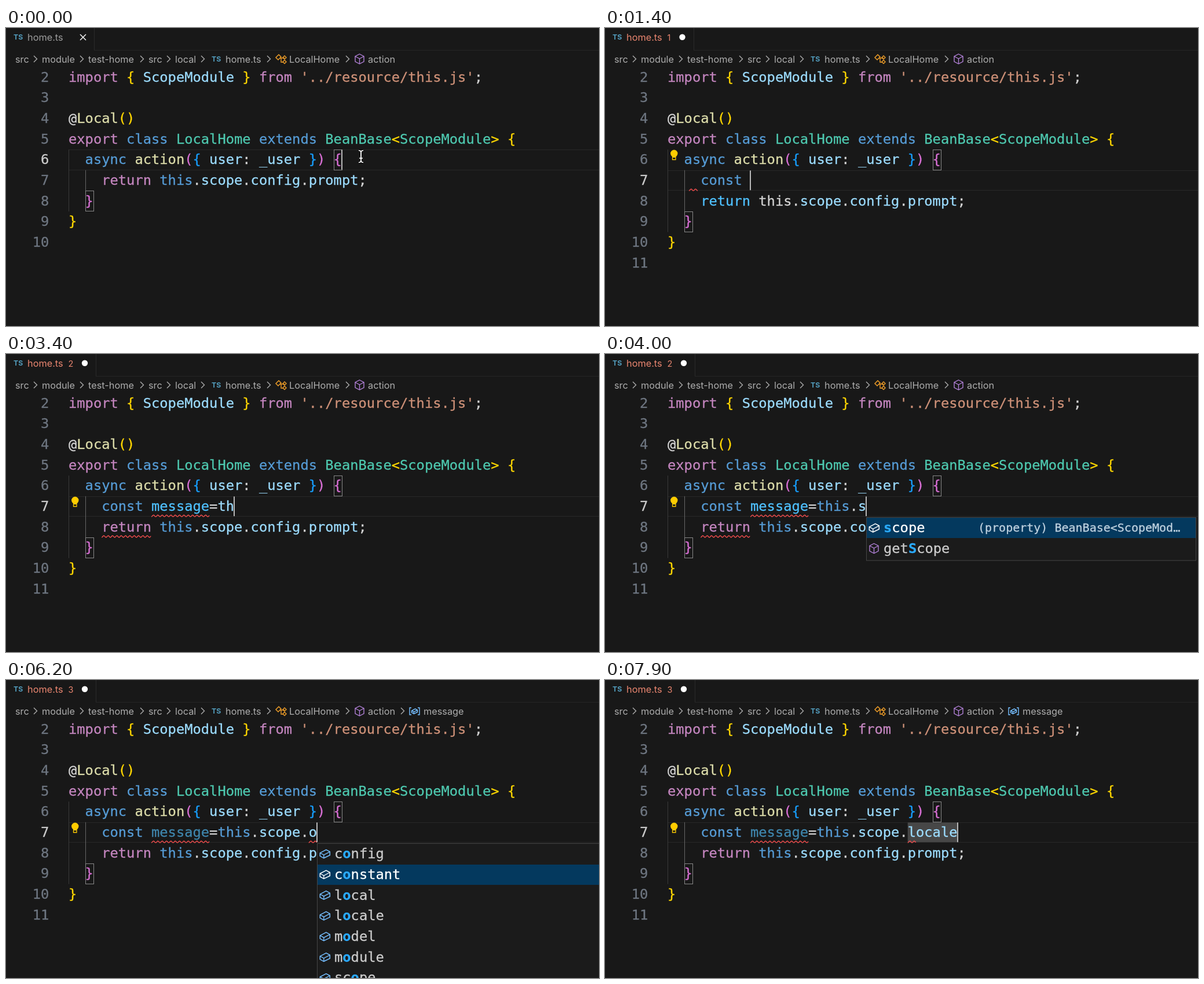
An HTML page with a canvas for the animation above (8 s loop, 1024 px wide and 515 px high).

```html
<!DOCTYPE html>
<html lang="en">
<head>
<meta charset="utf-8">
<title>Editor typing</title>
<style>
  html, body { margin: 0; width: 100%; height: 100%; overflow: hidden; background: #181818; }
  canvas { display: block; }
</style>
</head>
<body>
<canvas id="stage" width="1024" height="515"></canvas>
<script>
const ctx = document.getElementById('stage').getContext('2d');
const LOOP = 8000, LEFT = 108, CHAR = 14.3, LINE = 35.65, BASE = 7.8;
const MONO = '"DejaVu Sans Mono", monospace', SANS = 'Inter, sans-serif';
const C = {
  text: '#d4d4d4', flow: '#c586c0', key: '#569cd6', type: '#4ec9b0', name: '#9cdcfe', fn: '#dcdcaa',
  str: '#ce9178', gold: '#ffd700', pink: '#da70d6', blue: '#179fff', bind: '#4fc1ff', faded: '#3f86ad',
  dim: '#6e7681', crumb: '#adadad', error: '#f14c4c', tabError: '#ea8670', field: '#75beff', method: '#b180d7'
};

// Contents of line 7 after the indent, by time
const edits = [[500, '']];
const type = (start, step, before, added) => [...added].forEach((_, i) =>
  edits.push([start + i * step, before + added.slice(0, i + 1)]));
type(700, 100, '', 'const ');
type(1600, 100, 'const ', 'mess');
type(2400, 150, 'const mess', 'age');
type(2900, 100, 'const message', '=');
type(3300, 100, 'const message=', 'this.');
edits.push([3900, 'const message=this.s'], [4300, 'const message=this.scope'],
  [4600, 'const message=this.scope.'], [4900, 'const message=this.scope.o'],
  [7600, 'const message=this.scope.locale']);

const colX = col => LEFT + col * CHAR;
const mid = line => 85 + (line - 2) * LINE;
const between = (t, a, b) => t >= a && t < b;

function text(str, x, y, color, font) {
  ctx.font = font;
  ctx.fillStyle = color;
  ctx.fillText(str, x, y);
}
// A hairline outline gives the slightly heavier editor weight
function mono(str, x, y, color, weight = '', size = 23.75) {
  text(str, x, y, color, `${weight} ${size}px ${MONO}`);
  ctx.strokeStyle = color;
  ctx.lineWidth = .3;
  ctx.strokeText(str, x, y);
}
const sans = (str, x, y, color = C.crumb) => text(str, x, y, color, `16.3px ${SANS}`);
const badge = (x, y) => text('TS', x, y, '#519aba', `bold 12.3px ${SANS}`);

function rect(x, y, w, h, color) {
  ctx.fillStyle = color;
  ctx.fillRect(x, y, w, h);
}
function path(points, color, width = 1.4, close = false) {
  ctx.beginPath();
  points.forEach(([x, y]) => ctx.lineTo(x, y));
  if (close) ctx.closePath();
  ctx.strokeStyle = color;
  ctx.lineWidth = width;
  ctx.stroke();
}
function dot(x, y, r, color) {
  ctx.beginPath();
  ctx.arc(x, y, r, 0, 7);
  ctx.fillStyle = color;
  ctx.fill();
}

// Spans alternate colour name and text
function code(line, col, ...spans) {
  for (let i = 0; i < spans.length; i += 2) {
    mono(spans[i + 1], colX(col), mid(line) + BASE, C[spans[i]]);
    col += spans[i + 1].length;
  }
}
function squiggle(line, from, to) {
  const points = [], y = mid(line) + 16.5;
  for (let x = from; x <= to; x++) points.push([x, y + 1.5 * Math.cos((x - from) * Math.PI / 3.75)]);
  path(points, C.error, 1.4);
}
function bracketBox(line, col) {
  ctx.strokeStyle = '#888';
  ctx.lineWidth = 1;
  ctx.strokeRect(Math.round(colX(col)) + .5, Math.round(mid(line) - 18) + .5, 14, 35);
}
function cube(x, y, color) {
  const p = (dx, dy) => [x + dx, y + dy];
  path([p(0, -8.5), p(7.5, -4.5), p(7.5, 4.5), p(0, 8.5), p(-7.5, 4.5), p(-7.5, -4.5)], color, 1.4, true);
  path([p(-7.5, -4.5), p(0, -.5), p(7.5, -4.5)], color);
  path([p(0, -.5), p(0, 8.5)], color);
}
function brick(x, y, color, s = 1) {
  const p = (dx, dy) => [x + dx * s, y + dy * s];
  path([p(-8.5, -1.5), p(2, -7), p(8.5, -3.5), p(8.5, 2.5), p(-2, 7.5), p(-8.5, 4)], color, 1.5, true);
  path([p(-8.5, -1.5), p(-2, 2), p(8.5, -3.5)], color);
  path([p(-2, 2), p(-2, 7.5)], color);
}

function drawHeader(t) {
  const errors = t < 1000 ? 0 : t < 3000 ? 1 : t < 4500 ? 2 : 3;
  const edge = [152, 153, 155, 155][errors];
  rect(edge, 0, 1, 38, '#2b2b2b');
  rect(edge, 38, 1024, 1, '#252525');
  badge(13, 20);
  sans('home.ts', 37, 22, errors ? C.tabError : '#9d9d9d');
  if (errors) text(errors, 107.5, 21.5, C.tabError, `14.5px ${SANS}`);
  if (t < 500) {
    path([[128, 11], [138, 21]], '#eee', 1.6);
    path([[138, 11], [128, 21]], '#eee', 1.6);
  } else dot(errors > 1 ? 136 : 133.5, 15.7, 5.2, '#fff');

  const crumbs = [['src', 16, 51], ['module', 62, 131], ['test-home', 142, 235], ['src', 246, 281],
    ['local', 292, 340], ['home.ts', 379, 454], ['LocalHome', 489, 590], ['action', 625, 685], ['message', 721]];
  const shown = t >= 5300 ? 9 : 8;
  crumbs.slice(0, shown).forEach(([label, x, next], i) => {
    sans(label, x, 59.7);
    if (i < shown - 1) path([[next - 3, 48], [next + 2.5, 53.5], [next - 3, 59]], C.crumb);
  });
  badge(355, 58);
  const orange = '#ee9d28';
  path([[466, 51], [471, 46], [475, 50], [470, 55]], orange, 1.5, true);
  path([[473, 52], [481, 52]], orange);
  path([[475, 52], [475, 59], [479, 59]], orange);
  for (const y of [51, 58.5]) path([[478, y], [481, y - 3], [484, y], [481, y + 3]], orange, 1.4, true);
  cube(610.5, 53.5, C.method);
  if (shown > 8) {
    path([[700, 48], [697, 48], [697, 60], [700, 60]], C.field);
    path([[711, 48], [714, 48], [714, 60], [711, 60]], C.field);
    brick(705.5, 54, C.field, .58);
  }
}

function drawLineSeven(t, str) {
  if (between(t, 2200, 2400)) rect(colX(10), mid(7) - 17, 4 * CHAR, 34, '#474747');
  if (t >= 7800) rect(colX(29), mid(7) - 17, 6 * CHAR, 34, '#474747');
  const [, key, name, rest] = str.match(/^(\w* ?)(\w*)(.*)$/);
  const faded = between(t, 2200, 2400) || t >= 5900;
  code(7, 4, key.startsWith('const') ? 'key' : 'name', key, faded ? 'faded' : 'bind', name);
  let col = 4 + key.length + name.length;
  for (const part of rest.match(/\w+|\W/g) || []) {
    code(7, col, part === 'this' ? 'key' : /\w/.test(part) ? 'name' : 'text', part);
    col += part.length;
  }
  if (between(t, 1300, 1600)) squiggle(7, 145, 160);
  if (t >= 2000) squiggle(7, colX(10), colX(10 + name.length));
  if (between(t, 4900, 5300)) squiggle(7, colX(30), 545);
  if (t >= 5300) squiggle(7, colX(29), colX(30));
}

function drawBulb(y) {
  dot(119.3, y - 3.2, 6.2, '#ffcc00');
  rect(116, y, 6.6, 4, '#ffcc00');
  path([[116.5, y + 4], [116.5, y + 7.5], [122, y + 7.5], [122, y + 4]], '#ffcc00', 1.3);
}

function drawPopup(x, width, items, match, selected, detail, detailX) {
  const top = 282, row = 35.7;
  rect(x, top, width, items.length * row + 4, '#1b1b1b');
  ctx.strokeStyle = '#454545';
  ctx.lineWidth = 1;
  ctx.strokeRect(x + .5, top + .5, width - 1, items.length * row + 3);
  rect(x + 1, Math.round(top + 1 + selected * row), width - 2, 35, '#04395e');
  items.forEach((item, i) => {
    const y = 300.3 + i * row, on = i === selected;
    if (item.startsWith('get')) cube(x + 13.5, y, C.method);
    else brick(x + 13.8, y, on ? '#fff' : C.field);
    const hit = match ? item.toLowerCase().indexOf(match) : -1;
    [...item].forEach((ch, k) => mono(ch, x + 30 + k * CHAR, y + BASE,
      k === hit ? '#2aaaff' : on ? '#fff' : '#ccc', k === hit ? 'bold' : ''));
    if (on) mono(detail, detailX, y + 6.7, '#c0d2e0', '', 20);
  });
}

function drawMouse() {
  const bars = [[[609, 211.5], [612, 212.5], [613, 215], [613, 229], [612, 231.5], [609, 232.5]],
    [[617, 211.5], [614, 212.5], [613, 215], [613, 229], [614, 231.5], [617, 232.5]], [[610, 225], [616, 225]]];
  bars.forEach(b => path(b, '#000', 4));
  bars.forEach(b => path(b, '#fff', 1.6));
}

function draw(t) {
  rect(0, 0, 1024, 515, '#181818');
  const [since, str] = edits.filter(e => e[0] <= t).pop() || [0, null];
  const typing = str !== null, shift = typing ? 1 : 0, active = 6 + shift;
  drawHeader(t);

  for (const side of [-17.5, 17]) rect(LEFT, Math.round(mid(active) + side), 916, 1, '#282828');
  rect(LEFT, mid(6) - 17.5, 1, LINE * (3 + shift), '#3a3a3a');
  rect(137, mid(7) - 17.5, 1, LINE * (1 + shift), '#666');

  ctx.textAlign = 'right';
  for (let n = 2; n <= 10 + shift; n++) mono(n, 74.4, mid(n) + BASE, n === active ? '#ccc' : C.dim);
  ctx.textAlign = 'left';

  code(2, 0, 'flow', 'import', 'gold', ' { ', 'name', 'ScopeModule', 'gold', ' } ', 'flow', 'from ',
    'str', "'../resource/this.js'", 'text', ';');
  code(4, 0, 'text', '@', 'fn', 'Local', 'gold', '()');
  code(5, 0, 'flow', 'export ', 'key', 'class ', 'type', 'LocalHome ', 'key', 'extends ',
    'type', 'BeanBase', 'gold', '<', 'type', 'ScopeModule', 'gold', '> {');
  code(6, 2, 'key', 'async ', 'fn', 'action', 'pink', '(', 'blue', '{ ', 'name', 'user', 'text', ': ',
    'name', '_user', 'blue', ' }', 'pink', ') {');
  if (typing) drawLineSeven(t, str);

  const broken = between(t, 1200, 1600);
  code(7 + shift, 4, broken ? 'bind' : 'flow', 'return ', broken ? 'text' : 'key', 'this', 'text', '.',
    'name', 'scope', 'text', '.', 'name', 'config', 'text', '.', 'name', 'prompt', 'text', ';');
  if (between(t, 3000, 4300)) squiggle(8, colX(4), colX(10));
  code(8 + shift, 2, 'pink', '}');
  code(9 + shift, 0, 'gold', '}');
  bracketBox(6, 32);
  bracketBox(8 + shift, 2);

  if (t >= 1300) drawBulb(t < 1600 ? 220 : 256);
  if ((t - since) % 1000 < 500) {
    const col = typing ? 4 + str.length : 33;
    rect(Math.round(colX(col)) - 1, mid(active) - 17, 2, 34, '#b8b8b8');
  }

  if (between(t, 3900, 4300))
    drawPopup(451, 570, ['scope', 'getScope'], 's', 0, '(property) BeanBase<ScopeMod…', 644);
  if (between(t, 4600, 7600)) {
    const selected = t < 6200 ? 0 : t < 6400 ? 1 : t < 7200 ? 2 : 3;
    const detail = ['', '', '(property) local: IModule', '(property) locale: IModule'][selected];
    drawPopup(537, 570, ['config', 'constant', 'local', 'locale', 'model', 'module', 'scope'],
      t < 4900 ? '' : 'o', selected, detail, 729);
  }
  if (!typing) drawMouse();
}

function tick() {
  draw(performance.now() % LOOP);
  requestAnimationFrame(tick);
}
tick();
</script>
</body>
</html>
```
